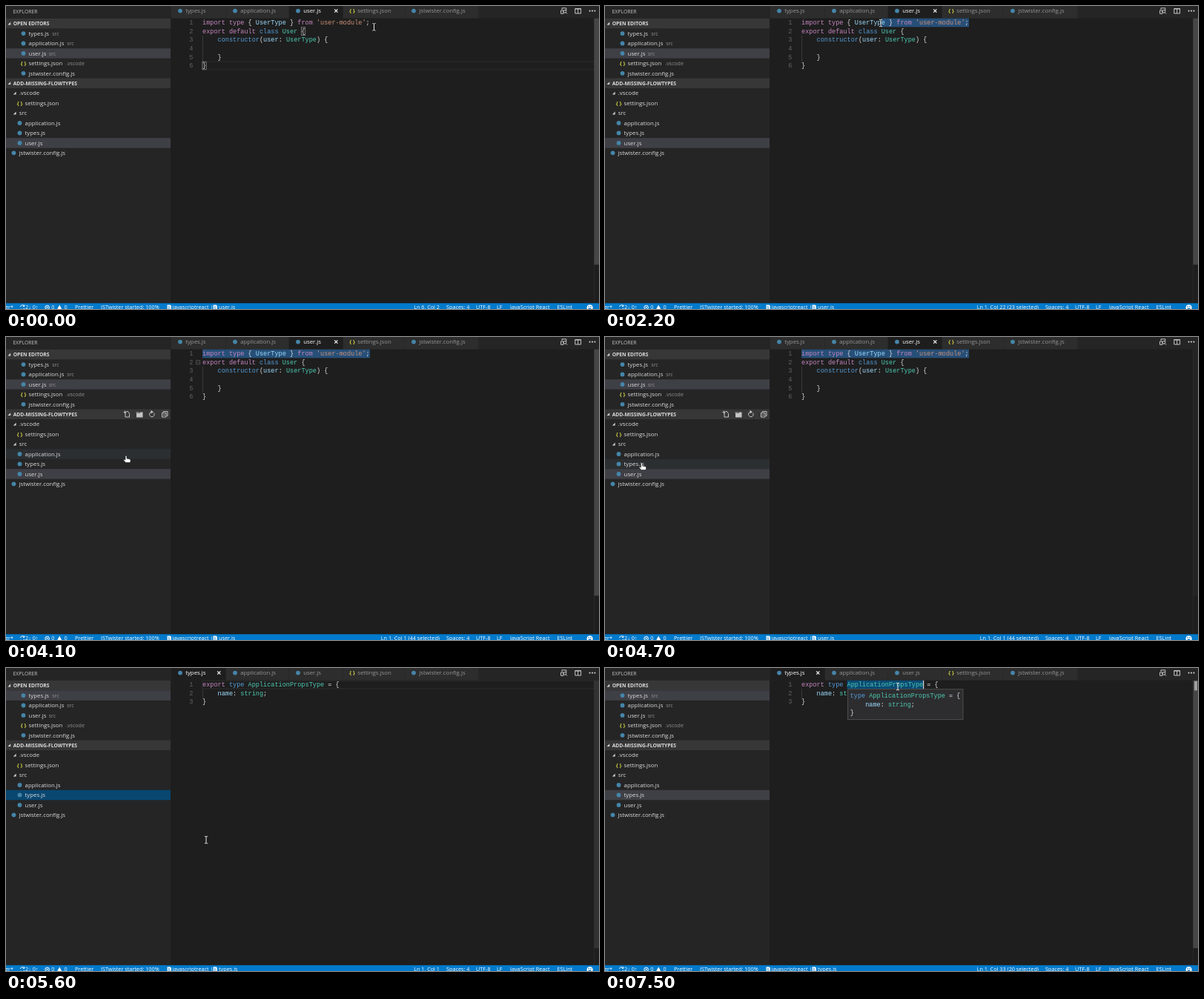
An HTML page that plays this animation: 800 px wide and 409 px high, repeating every 8000 ms.

```html
<!DOCTYPE html>
<html lang="en">
<head>
<meta charset="utf-8">
<title>Editor session</title>
<style>
  html, body { margin: 0; width: 100%; height: 100%; overflow: hidden; background: #1e1e1e; }
  svg { display: block; width: 800px; height: 409px; }
  text { font-family: 'Open Sans', 'Noto Sans', sans-serif; font-size: 7.8px; font-weight: 500; fill: #dcdcdc; white-space: pre; }
  .code { font-family: 'Liberation Mono', 'DejaVu Sans Mono', monospace; font-size: 8.56px; font-weight: 400; fill: #dcdcdc; }
  .num { fill: #626262; text-anchor: end; }
  .head { font-size: 6.72px; font-weight: 700; }
  .title { font-size: 6.9px; fill: #c0c0c0; }
  .dim { font-size: 7.05px; fill: #929292; }
  .json { font-size: 7.4px; font-weight: 700; fill: #cbcb41; text-anchor: middle; }
  .status { font-size: 7.27px; fill: #fff; }
  .line { fill: none; stroke: #c5c5c5; stroke-width: 1; }
</style>
</head>
<body>
<svg id="stage" viewBox="0 0 800 409"></svg>
<script>
const LOOP = 8000;
const CHAR = 5.136, CODE_X = 265, LINE = 11.6, CODE_Y = 16.7;
const ROW = 13.44, SIDE_Y = 16.9, SIDE_W = 222;
const PINK = '#c586c0', BLUE = '#569cd6', SKY = '#9cdcfe', TEAL = '#4ec9b0', RUST = '#ce9178';
const stage = document.getElementById('stage');

function el(name, attrs, parent = stage) {
  const node = document.createElementNS('http://www.w3.org/2000/svg', name);
  for (const key in attrs) node.setAttribute(key, attrs[key]);
  parent.appendChild(node);
  return node;
}
const group = parent => el('g', {}, parent);
const rect = (x, y, width, height, fill, parent) => el('rect', { x, y, width, height, fill }, parent);
const path = (d, attrs = { class: 'line' }, parent) => el('path', { d, ...attrs }, parent);
function label(x, y, str, cls = '', parent) {
  const node = el('text', { x, y, class: cls }, parent);
  node.textContent = str;
  return node;
}
const show = (node, on) => node.setAttribute('visibility', on ? 'inherit' : 'hidden');
const clamp = v => Math.max(0, Math.min(1, v));
const colX = col => CODE_X + (col - 1) * CHAR;
const lineY = n => CODE_Y + (n - 1) * LINE;
const rowY = n => SIDE_Y + n * ROW;

// Each part is either plain text or [text, colour].
function codeLine(x, y, parts, parent) {
  const node = el('text', { x, y, class: 'code' }, parent);
  for (const part of parts) {
    const [str, fill] = Array.isArray(part) ? part : [part, '#dcdcdc'];
    el('tspan', { fill }, node).textContent = str;
  }
}
function fileIcon(x, y, json, parent) {
  if (json) label(x, y + 2.6, '{ }', 'json', parent);
  else el('circle', { cx: x, cy: y, r: 2.9, fill: '#4585a8' }, parent);
}

// Sidebar
rect(0, 0, SIDE_W, 409, '#252526');
label(9.5, 9.6, 'EXPLORER', 'title');
rect(0, rowY(0), SIDE_W, ROW, '#373738');
rect(0, rowY(6), SIDE_W, ROW, '#373738');
const hoverRow = rect(0, 0, SIDE_W, ROW, '#2c2f31');
const openRow = rect(0, 0, SIDE_W, ROW, '#3f3f46');
const treeRow = rect(0, 0, SIDE_W, ROW, '#3f3f46');

function arrow(x, row) {
  const y = rowY(row) + ROW / 2;
  path(`M${x + 3.6} ${y - 2}V${y + 1.8}H${x - 0.2}Z`, { fill: '#d0d0d0' });
}
function header(row, str) {
  arrow(2.6, row);
  label(9.7, rowY(row) + 9.1, str, 'head');
}
function file(row, x, name, folder, folderX) {
  const y = rowY(row) + ROW / 2;
  fileIcon(x - 7.5, y, name.endsWith('json'));
  label(x - 0.4, y + 2.7, name);
  if (folder) label(folderX, y + 2.7, folder, 'dim');
}
function folder(row, name) {
  arrow(10, row);
  label(17.8, rowY(row) + 9.4, name);
}
header(0, 'OPEN EDITORS');
file(1, 31, 'types.js', 'src', 62.2);
file(2, 31, 'application.js', 'src', 82.2);
file(3, 31, 'user.js', 'src', 57.7);
file(4, 31, 'settings.json', '.vscode', 81.2);
file(5, 31, 'jstwister.config.js');
header(6, 'ADD-MISSING-FLOWTYPES');
folder(7, '.vscode');
file(8, 26, 'settings.json');
folder(9, 'src');
file(10, 26, 'application.js');
file(11, 26, 'types.js');
file(12, 26, 'user.js');
file(13, 18, 'jstwister.config.js');

const actions = group();
path('M161 101.5V108H166.5V103.5L164.5 100.5H162.5M158.5 101.5H162.5M160.5 99.5V103.5', undefined, actions);
path('M176 103H180L181 101.5H184.5V108.5H176ZM175.5 101.5H179.5V102.5H175.5Z', { fill: '#c5c5c5' }, actions);
path('M199.6 102.6A3.3 3.3 0 1 1 196 101.2', undefined, actions);
path('M195.5 98.8L199 101.2L195.5 103.5Z', { fill: '#c5c5c5' }, actions);
path('M212 101.5V100.5H218V106.5H217M210.5 102.5H216V108H210.5ZM212 105.2H214.6', undefined, actions);

// Tabs
rect(SIDE_W, 0, 800 - SIDE_W, 16.7, '#252526');
const tabs = [
  [223, 297, 'types.js'], [297, 382, 'application.js'], [382, 455, 'user.js'],
  [455, 538, 'settings.json'], [538, 638, 'jstwister.config.js']
].map(([x, end, name]) => {
  const bg = rect(x, 0, end - x - 0.6, 16.7, '#2d2d2d');
  fileIcon(x + 12, 6.6, name.endsWith('json'));
  const text = label(x + 19.2, 9.3, name);
  const close = path(`M${end - 11.8} 4.4L${end - 7.6} 8.6M${end - 7.6} 4.4L${end - 11.8} 8.6`,
    { stroke: '#eee', 'stroke-width': 1.3 });
  return { bg, text, close };
});
function activateTab(index) {
  tabs.forEach(({ bg, text, close }, i) => {
    const on = i === index;
    bg.setAttribute('fill', on ? '#1e1e1e' : '#2d2d2d');
    text.style.fill = on ? '#fff' : '#969696';
    show(close, on);
  });
}
path('M750 2.8H755.8V6M750 2.8V5M748.6 6H752V10.3H748.6ZM757 10.5L755 8.5');
el('circle', { cx: 754, cy: 7.3, r: 1.9, class: 'line' });
path('M767.8 3.5H775.6V10H767.8ZM771.7 3.5V10M767.8 4H775.6', { class: 'line', 'stroke-width': 1.2 });
for (const x of [787.6, 791, 794.4]) el('circle', { cx: x, cy: 6.6, r: 1.05, fill: '#d0d0d0' });

// Editor
rect(SIDE_W, 16.7, 800 - SIDE_W, 384.6, '#1e1e1e');
const lineMark = el('rect', { x: CODE_X, width: 529, height: LINE - 1, fill: 'none', stroke: '#2c2c2c' });
const selection = rect(0, CODE_Y, 0, LINE, '#264f78');

function page(lines, guideFrom, guideTo) {
  const g = group();
  rect(CODE_X, lineY(guideFrom), 0.8, LINE * (guideTo - guideFrom + 1), '#404040', g);
  lines.forEach((parts, i) => {
    const y = lineY(i + 1) + 8.5;
    label(252.3, y, i + 1, 'code num', g);
    codeLine(CODE_X, y, parts, g);
  });
  return g;
}
const userPage = page([
  [['import type', PINK], ' { ', ['UserType', SKY], ' } ', ['from ', PINK], ["'user-module'", RUST], ';'],
  [['export default ', PINK], ['class ', BLUE], ['User', TEAL], ' {'],
  ['    ', ['constructor', BLUE], '(', ['user', SKY], ': ', ['UserType', TEAL], ') {'],
  [],
  ['    }'],
  ['}']
], 3, 5);
const typesPage = page([
  [['export ', PINK], ['type ', BLUE], ['ApplicationPropsType', TEAL], ' = {'],
  ['    ', ['name', SKY], ': ', ['string', TEAL], ';'],
  ['}']
], 2, 2);

const brackets = group();
for (const [col, n] of [[27, 2], [1, 6]])
  el('rect', { x: colX(col), y: lineY(n) + 0.5, width: CHAR, height: LINE - 1,
    fill: 'none', stroke: '#888', 'stroke-width': 0.8 }, brackets);

const fold = path('M256.6 31.6H261.6V36.8H256.6ZM257.8 34.2H260.4',
  { fill: 'none', stroke: '#5c5c5c', 'stroke-width': 0.8 });
const caret = rect(0, CODE_Y + 0.2, 1.2, LINE - 0.2, '#d8d8d8');
rect(793, CODE_Y, 0.6, 384.6, '#303030');
const slider = rect(793.4, CODE_Y, 6.6, 332.5, '#464646');
const matchMark = rect(795, CODE_Y + 1, 4, 12.6, '#a0a0a0');

const tip = group();
el('rect', { x: 327.5, y: 28.7, width: 155.5, height: 40.8, fill: '#2d2d30', stroke: '#555', 'stroke-width': 0.8 }, tip);
[
  [['type ', BLUE], ['ApplicationPropsType', TEAL], ' = {'],
  ['    ', ['name', SKY], ': ', ['string', TEAL], ';'],
  ['}']
].forEach((parts, i) => codeLine(330.7, 40 + i * LINE, parts, tip));

// Status bar
rect(0, 401.2, 800, 8, '#007acc');
const status = (x, str) => label(x, 409.3, str, 'status');
const white = { fill: 'none', stroke: '#fff', 'stroke-width': 1 };
status(-1, 'er*');
path('M19.4 406A3 3 0 0 1 24.6 404.8M24.8 407.8A3 3 0 0 1 19.8 408.8M24.8 403.4V405.4H22.8', white);
status(26, '2↓ 0↑');
el('circle', { cx: 55.6, cy: 407, r: 2.8, ...white });
path('M54.4 405.8L56.8 408.2M56.8 405.8L54.4 408.2', white);
status(61.3, '0');
path('M72.2 403.6L75.6 409.8H68.8Z', { fill: '#fff' });
status(78.6, '0');
status(93, 'Prettier');
status(128, 'JSTwister started: 100%');
for (const x of [217.5, 279.5]) {
  path(`M${x} 403.4H${x + 4}L${x + 5.4} 404.8V409.8H${x}Z`, { fill: '#fff' });
  path(`M${x + 1} 405.8H${x + 3.4}M${x + 1} 407.8H${x + 4.2}`, { stroke: '#007acc', 'stroke-width': 0.8 });
}
status(224.3, 'javascriptreact |');
const fileStatus = status(287, '');
const place = status(585, '');
place.setAttribute('text-anchor', 'end');
status(594, 'Spaces: 4');
status(634, 'UTF-8');
status(662, 'LF');
status(680, 'JavaScript React');
status(743.5, 'ESLint');
el('circle', { cx: 787.6, cy: 407.2, r: 4, fill: '#fff' });
path('M785.4 407.8A2.3 2.3 0 0 0 789.8 407.8ZM785.6 405.1H786.8V406.4H785.6ZM788.4 405.1H789.6V406.4H788.4Z', { fill: '#007acc' });

// Pointer shapes, drawn around their hot spots
const pointer = group();
const shapes = {
  beam: path('M-2 -4.7H-.7L0 -4L.7 -4.7H2M0 -4V4M-2 4.7H-.7L0 4L.7 4.7H2',
    { fill: 'none', stroke: '#e4e4e4', 'stroke-width': 1 }, pointer),
  arrow: path('M0 0V9.8L2.3 7.8L3.9 11.4L5.6 10.6L4 7.2H7Z',
    { fill: '#fff', stroke: '#111', 'stroke-width': 0.7 }, pointer),
  hand: path('M-1 .8Q0 -.8 1 .8V4L5 4.8Q6.6 5.4 6.1 7.4L5.5 9.6H-.5L-3.4 6.2Q-3.2 4.4 -1 6Z',
    { fill: '#fff', stroke: '#111', 'stroke-width': 0.6 }, pointer)
};

// Runs of pointer positions: start time, then one x,y pair per 100 ms
const moves = [
  [0, 496.5, 28.3, 497, 26.5, 498, 24.5, 497, 23.5],
  [2000, 482, 23, 430, 23, 372, 23, 318, 23, 280, 22, 257, 20, 250, 19],
  [3100, 252, 24, 257, 33, 268, 42, 281, 54, 290, 64, 293, 74, 286, 78, 270, 76],
  [3900, 240, 100, 204, 136, 162, 160, 120, 168, 92, 171, 74, 172, 62, 171, 54, 170, 49.5, 170],
  [5300, 58, 174, 96, 190, 170, 214, 270, 232, 370, 241, 430, 238],
  [5900, 422, 150, 408, 60, 400.5, 22.5],
  [6700, 399, 23, 397, 24, 396, 24.5, 395, 25]
];
function pointerAt(t) {
  const [start, ...xy] = moves.filter(run => run[0] <= t).pop();
  const i = 2 * Math.min(Math.floor((t - start) / 100), xy.length / 2 - 1);
  return [xy[i], xy[i + 1]];
}

function select(from, to, fill) {
  selection.setAttribute('x', colX(from));
  selection.setAttribute('width', (to - from) * CHAR);
  selection.setAttribute('fill', fill);
}

function editorState(t, x) {
  if (t < 600) return { line: 6, col: 2, caret: false };
  if (t < 2000) return { line: 1, col: 45, caret: t < 1000 || t >= 1500 };
  if (t < 5200) {
    const col = Math.max(1, Math.round((x - CODE_X) / CHAR) + 1);
    const from = t < 2600 ? col : 1;
    return { line: 1, col: from, from, to: 45 };
  }
  if (t < 6300) return { line: 1, col: 1 };
  if (t < 6500) return { line: 1, col: 27, caret: true };
  return { line: 1, col: 33, from: 13, to: 33, caret: t < 7000 || t >= 7300 };
}

// The slider fades out once the pointer has left the editor.
function sliderOpacity(t) {
  return t < 5500 ? clamp((4800 - t) / 600) : clamp((t - 5500) / 200);
}

function draw(t) {
  const [x, y] = pointerAt(t);
  const s = editorState(t, x);
  const inSide = x < SIDE_W, inTypes = t >= 5200, picked = t >= 5000, matched = t >= 6700;

  pointer.setAttribute('transform', `translate(${x} ${y})`);
  const shape = inSide ? 'hand' : x < 262 ? 'arrow' : 'beam';
  for (const key in shapes) show(shapes[key], key === shape);

  const row = Math.floor((y - SIDE_Y) / ROW);
  show(hoverRow, inSide && row > 6 && row < 14);
  hoverRow.setAttribute('y', rowY(row));
  openRow.setAttribute('y', rowY(picked ? 1 : 3));
  treeRow.setAttribute('y', rowY(picked ? 11 : 12));
  treeRow.setAttribute('fill', picked && t < 6300 ? '#094771' : '#3f3f46');
  show(actions, inSide);

  activateTab(inTypes ? 0 : 2);
  show(userPage, !inTypes);
  show(typesPage, inTypes);
  slider.setAttribute('height', inTypes ? 361.5 : 332.5);
  slider.setAttribute('opacity', sliderOpacity(t));
  show(brackets, t < 600);
  show(fold, t >= 3100 && t < 4600);

  show(selection, s.to);
  if (s.to) select(s.from, s.to, matched ? '#0b4b74' : picked && !inTypes ? '#3a3d41' : '#264f78');
  show(matchMark, matched);
  show(lineMark, !s.to || (t >= 6500 && !matched));
  lineMark.setAttribute('y', lineY(s.line) + 0.5);
  show(caret, s.caret);
  caret.setAttribute('x', colX(s.col) - 0.3);

  show(tip, t >= 7300);
  tip.setAttribute('opacity', clamp((Math.floor((t - 7300) / 100) + 1) / 3));

  fileStatus.textContent = inTypes ? 'types.js' : 'user.js';
  place.textContent = `Ln ${s.line}, Col ${s.col}` + (s.to ? ` (${s.to - s.from} selected)` : '');
}

const began = performance.now();
function tick() {
  draw((performance.now() - began) % LOOP);
  requestAnimationFrame(tick);
}
tick();
</script>
</body>
</html>
```
